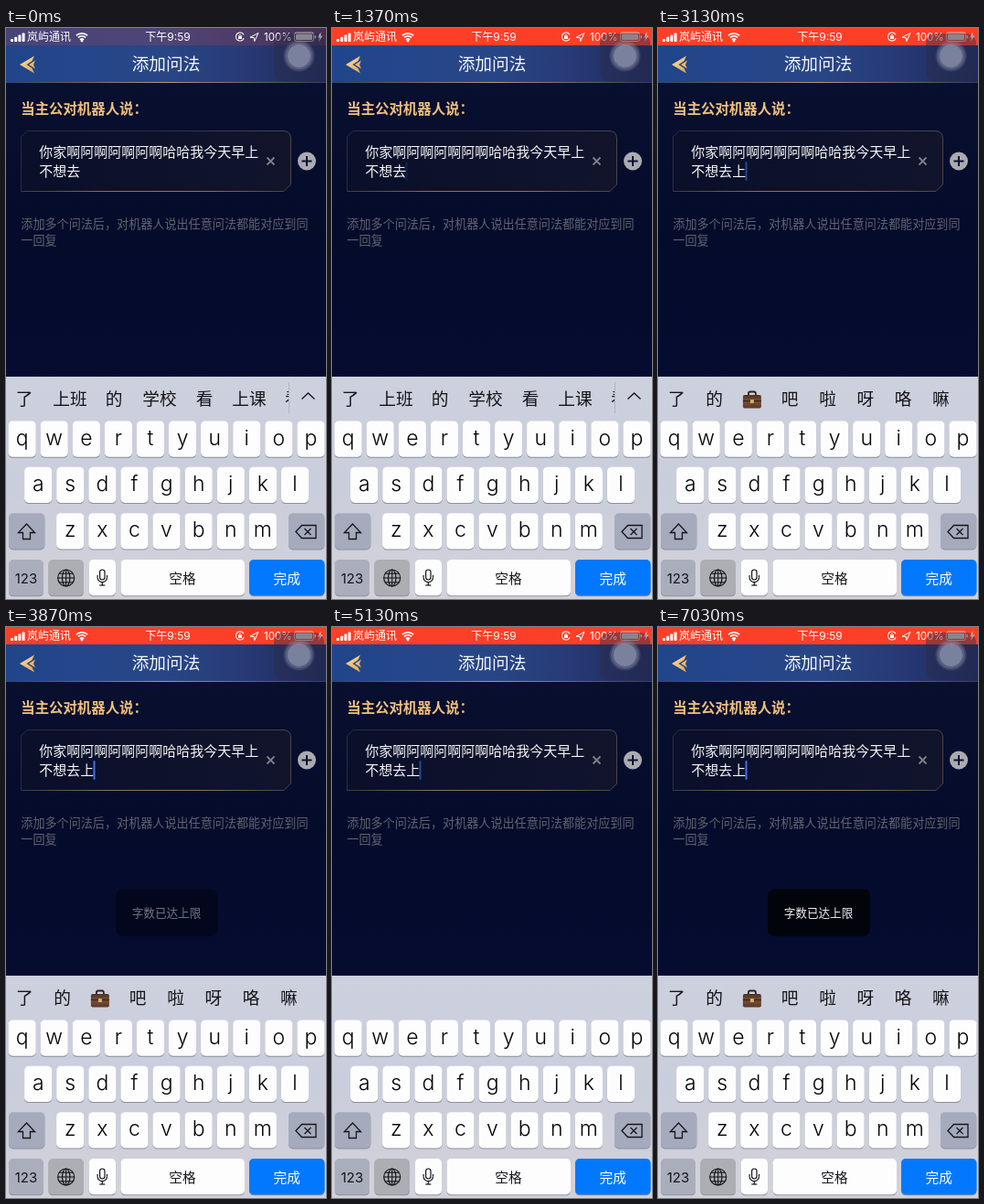
Animation, 350 px wide and 624 px high, one loop 7390 ms. Source, as an HTML page with a canvas:

```html
<!DOCTYPE html>
<html lang="zh-CN">
<head>
<meta charset="utf-8">
<title>添加问法</title>
<style>
  html, body { margin: 0; width: 100%; height: 100%; overflow: hidden; background: #050a2c; }
  canvas { display: block; width: 350px; height: 624px; }
</style>
</head>
<body>
<canvas id="stage"></canvas>
<script>
const W = 350, H = 624, LOOP = 7390, TYPED = 2530;
const FONT = "Inter, 'Noto Sans CJK SC', 'Noto Sans CJK', sans-serif";
const canvas = document.getElementById('stage');
const ctx = canvas.getContext('2d');
const ratio = window.devicePixelRatio || 1;
canvas.width = W * ratio;
canvas.height = H * ratio;

const clamp = v => Math.max(0, Math.min(1, v));
const ramp = (t, from, to) => clamp((t - from) / (to - from));
const easeInOut = p => p < 0.5 ? 2 * p * p : 1 - 2 * (1 - p) * (1 - p);

// y is the vertical centre of the glyphs
function text(str, x, y, size, color, align = 'left', weight = 400) {
  ctx.font = `${weight} ${size}px ${FONT}`;
  ctx.textAlign = align;
  ctx.fillStyle = color;
  ctx.fillText(str, x, y + size * 0.37);
}

function box(x, y, w, h, r, color) {
  ctx.beginPath();
  ctx.roundRect(x, y, w, h, r);
  ctx.fillStyle = color;
  ctx.fill();
}

function disc(x, y, r, color) {
  ctx.beginPath();
  ctx.arc(x, y, r, 0, 7);
  ctx.fillStyle = color;
  ctx.fill();
}

function path(points, color, width, close) {
  ctx.beginPath();
  points.forEach(([x, y]) => ctx.lineTo(x, y));
  if (close) ctx.closePath();
  if (width) {
    ctx.lineWidth = width;
    ctx.strokeStyle = color;
    ctx.stroke();
  } else {
    ctx.fillStyle = color;
    ctx.fill();
  }
}

function arc(x, y, r, from, to, color, width) {
  ctx.beginPath();
  ctx.arc(x, y, r, from, to);
  ctx.lineWidth = width;
  ctx.strokeStyle = color;
  ctx.stroke();
}

function gradient(x0, y0, x1, y1, ...colors) {
  const g = ctx.createLinearGradient(x0, y0, x1, y1);
  colors.forEach((c, i) => g.addColorStop(i / (colors.length - 1), c));
  return g;
}

function faded(alpha, draw) {
  if (alpha <= 0) return;
  ctx.save();
  ctx.globalAlpha = alpha;
  draw();
  ctx.restore();
}

function background() {
  ctx.fillStyle = gradient(0, 60, 0, 381, '#090f2f', '#050b2b', '#050c30');
  ctx.fillRect(0, 0, W, H);
  ctx.fillStyle = gradient(0, 0, W, 0, '#20458a', '#25468a', '#284686', '#273a76', '#1d2a5a');
  ctx.fillRect(0, 0, W, 60);
  ctx.fillStyle = gradient(0, 0, W, 0, '#3a4260', '#75685e', '#b09a74', '#75685e', '#3a3c54');
  ctx.fillRect(0, 59, W, 1);

  const gold = gradient(15, 30, 33, 50, '#ffe3a0', '#e0a050');
  path([[15, 40], [31, 30.5], [28.5, 36], [22.5, 40], [28.5, 44], [31, 49.5]], gold, 0, true);
  path([[25, 40], [32, 35.5], [30, 40], [32, 44.5]], gold, 0, true);
  text('添加问法', 175, 39, 18.7, '#f4f5f8', 'center');
}

function form() {
  text('当主公对机器人说：', 16.3, 88.5, 15.4, '#efbf7c', 'left', 700);

  ctx.beginPath();
  ctx.moveTo(16.5, 119);
  ctx.lineTo(23, 112.5);
  ctx.lineTo(303, 112.5);
  ctx.quadraticCurveTo(311.5, 112.5, 311.5, 121);
  ctx.lineTo(311.5, 171);
  ctx.lineTo(304, 178.5);
  ctx.lineTo(16.5, 178.5);
  ctx.closePath();
  ctx.fillStyle = gradient(17, 0, 312, 0, '#0a0f2a', '#11142b');
  ctx.fill();
  ctx.lineWidth = 1;
  ctx.strokeStyle = gradient(17, 0, 312, 0, '#2a2d42', '#2c2f42', '#4b4748');
  ctx.stroke();
  path([[16.5, 178.5], [304, 178.5]],
    gradient(17, 0, 304, 0, '#3f3a40', '#8a7450', '#8f7850', '#4b4444'), 1);

  text('你家啊阿啊阿啊阿啊哈哈我今天早上', 36.3, 135, 15, '#f5f6f8');
  path([[285.5, 141.5], [293.5, 149.5]], '#7e828c', 1.8);
  path([[293.5, 141.5], [285.5, 149.5]], '#7e828c', 1.8);
  disc(329, 145.5, 10, '#a9abb0');
  path([[323.5, 145.5], [334.5, 145.5]], '#0b1130', 2);
  path([[329, 140], [329, 151]], '#0b1130', 2);

  text('添加多个问法后，对机器人说出任意问法都能对应到同', 16.3, 214, 13.1, '#60656f');
  text('一回复', 16.3, 232, 13.1, '#60656f');
}

// Blinks once a second; the timer restarts when text is inserted.
function caretAlpha(t) {
  if (t < 370) return 0;
  if (t >= TYPED && t < TYPED + 500) return 1;
  const phase = (t - (t < TYPED ? 370 : TYPED)) % 1000;
  return phase < 500 ? ramp(phase, -30, 130) : 1 - ramp(phase, 500, 730);
}

function typing(t) {
  const typed = t >= TYPED;
  text(typed ? '不想去上' : '不想去', 36.3, 156.5, 15, '#f5f6f8');
  faded(caretAlpha(t), () => box(typed ? 95.5 : 80.5, 146, 2, 21, 1, '#3f70e8'));
}

function toastAlpha(t) {
  if (t < 5130) return easeInOut(ramp(t, 3530, 4230)) * (1 - ramp(t, 5030, 5110));
  return easeInOut(ramp(t, 5540, 6240));
}

function toast(t) {
  faded(toastAlpha(t), () => {
    box(120, 286, 112, 52, 8, '#02040c');
    text('字数已达上限', 175.5, 312.5, 12.6, '#f2f3f5', 'center');
  });
}

function briefcase(x, y) {
  ctx.beginPath();
  ctx.roundRect(x - 4, y - 9, 8, 6, 2);
  ctx.lineWidth = 1.8;
  ctx.strokeStyle = '#2e211d';
  ctx.stroke();
  box(x - 10, y - 5.5, 20, 14.5, 2, gradient(0, y - 6, 0, y + 9, '#4a3024', '#7a4f37', '#5a3827'));
  ctx.fillStyle = '#33221b';
  ctx.fillRect(x - 10, y + 0.5, 20, 1.2);
  box(x - 2, y - 0.5, 4, 4, 0.8, '#d3b069');
}

function candidates(t) {
  const ink = '#15161a', y = 405.5, size = 18.7;
  if (t < 2470) {
    [['了', 20], ['上班', 70], ['的', 118], ['学校', 168], ['看', 217], ['上课', 266]]
      .forEach(([word, x]) => text(word, x, y, size, ink, 'center'));
    ctx.save();
    ctx.beginPath();
    ctx.rect(290, 382, 19, 44);
    ctx.clip();
    text('看', 305, y, size, ink);
    ctx.restore();
    path([[309.5, 387], [309.5, 421]], '#b3b6bf', 1);
    path([[323.5, 405.5], [330.5, 399], [337.5, 405.5]], ink, 1.3);
    return;
  }
  if (t < TYPED || (t >= 5100 && t < 5300)) return;
  [...'了的 吧啦呀咯嘛'].forEach((word, i) => {
    const x = 20.3 + 41.3 * i;
    if (word === ' ') briefcase(x, y + 1);
    else text(word, x, y, size, ink, 'center');
  });
}

function key(x, y, w, color) {
  box(x, y + 1, w, 39.3, 4.7, '#8d909c');
  box(x, y, w, 39.2, 4.7, color);
}

function letters(row, center, y) {
  [...row].forEach((ch, i) => {
    const x = center + 35.1 * i;
    key(x - 15.1, y, 30.2, '#fdfdfe');
    ctx.font = `300 23px ${FONT}`;
    ctx.textAlign = 'center';
    ctx.fillStyle = '#050507';
    ctx.fillText(ch, x, y + 26.2);
  });
}

function keyboard() {
  const ink = '#15161a', grey = '#a6aabd';
  ctx.fillStyle = gradient(0, 381, 0, H, '#cdd0dd', '#cacddb', '#d2d2da');
  ctx.fillRect(0, 381, W, H - 381);
  letters('qwertyuiop', 17.6, 429.5);
  letters('asdfghjkl', 35.2, 479.8);
  letters('zxcvbnm', 70.2, 530.2);

  key(3, 530.2, 39.3, grey);
  path([[22.5, 542], [31.5, 551.5], [26.5, 551.5], [26.5, 558.5], [18.5, 558.5], [18.5, 551.5], [13.5, 551.5]],
    ink, 1.3, true);
  key(309, 530.2, 39.3, grey);
  path([[317, 550.5], [323.5, 543.5], [339, 543.5], [339, 557.5], [323.5, 557.5]], ink, 1.3, true);
  path([[326.5, 547], [333.5, 554]], ink, 1.3);
  path([[333.5, 547], [326.5, 554]], ink, 1.3);

  key(3, 581, 38, '#aaaebc');
  text('123', 22, 601, 15, ink, 'center');
  key(46.5, 581, 38.5, '#adadb4');
  globe(65.7, 601, ink);
  key(90.7, 581, 29.3, '#fdfdfe');
  mic(105.3, 600.5, ink);
  key(125.5, 581, 135.5, '#fdfdfe');
  text('空格', 193, 601.5, 14.7, ink, 'center');
  key(266, 581, 82.5, '#0278fe');
  text('完成', 307.3, 601.5, 14.7, '#ffffff', 'center');
}

function globe(x, y, color) {
  arc(x, y, 9, 0, 7, color, 1.2);
  ctx.beginPath();
  ctx.ellipse(x, y, 4.2, 9, 0, 0, 7);
  ctx.stroke();
  path([[x, y - 9], [x, y + 9]], color, 1.1);
  path([[x - 9, y], [x + 9, y]], color, 1.1);
  for (const d of [-4.8, 4.8]) path([[x - 7.5, y + d], [x + 7.5, y + d]], color, 1.1);
}

function mic(x, y, color) {
  ctx.beginPath();
  ctx.roundRect(x - 2.7, y - 8.5, 5.4, 11, 2.7);
  ctx.lineWidth = 1.2;
  ctx.strokeStyle = color;
  ctx.stroke();
  path([[x - 5.2, y - 2.5], [x - 5.2, y]], color, 1.2);
  path([[x + 5.2, y - 2.5], [x + 5.2, y]], color, 1.2);
  arc(x, y, 5.2, 0, Math.PI, color, 1.2);
  path([[x, y + 5.2], [x, y + 8.5]], color, 1.2);
  path([[x - 3, y + 8.5], [x + 3, y + 8.5]], color, 1.2);
}

function statusBar(t) {
  const white = '#ffffff';
  faded(0.18 + 0.82 * ramp(t, 30, 400), () => {
    ctx.fillStyle = '#fd3f28';
    ctx.fillRect(0, 0, W, 19);
  });
  for (let i = 0; i < 4; i++) box(5 + i * 4.2, 12 - i * 2.2, 3, 3 + i * 2.2, 0.8, white);
  text('岚屿通讯', 23, 9.8, 12, white);

  for (const r of [3.8, 7, 10]) arc(83, 15, r - 0.8, -2.3, -0.84, white, 1.7);
  disc(83, 14, 1.4, white);
  text('下午9:59', 177, 9.8, 12, white, 'center');

  arc(256, 9.5, 4.5, 0.4, 5.8, white, 1.1);
  box(254, 8.7, 4, 3.3, 0.5, white);
  arc(256, 8.7, 1.3, Math.PI, 0, white, 0.8);
  path([[267, 10.2], [276, 5.5], [271.8, 14.5], [271.3, 10.6]], white, 1, true);
  text('100%', 282, 9.8, 11.6, white);

  ctx.beginPath();
  ctx.roundRect(315.5, 5, 21, 9.5, 2);
  ctx.lineWidth = 0.8;
  ctx.strokeStyle = '#e8dcda';
  ctx.stroke();
  box(317, 6.5, 18, 6.5, 1, '#d5cfca');
  box(337.5, 8, 1.5, 3.5, 0.7, '#e8dcda');
  path([[344.5, 4.5], [341, 10.5], [343.2, 10.5], [342, 15], [346, 8.8], [343.7, 8.8]], white, 0, true);
}

function floatingButton() {
  box(293, 6, 55, 52, 11, 'rgba(40,44,72,0.45)');
  disc(320.5, 30.5, 17, 'rgba(130,136,162,0.25)');
  disc(320.5, 30.5, 15, 'rgba(140,146,172,0.35)');
  disc(320.5, 30.5, 12.5, 'rgba(175,180,200,0.4)');
}

function render(t) {
  ctx.setTransform(ratio, 0, 0, ratio, 0, 0);
  background();
  form();
  typing(t);
  toast(t);
  keyboard();
  candidates(t);
  statusBar(t);
  floatingButton();
}

const begin = performance.now();
function tick() {
  render((performance.now() - begin) % LOOP);
  requestAnimationFrame(tick);
}
tick();
</script>
</body>
</html>
```
